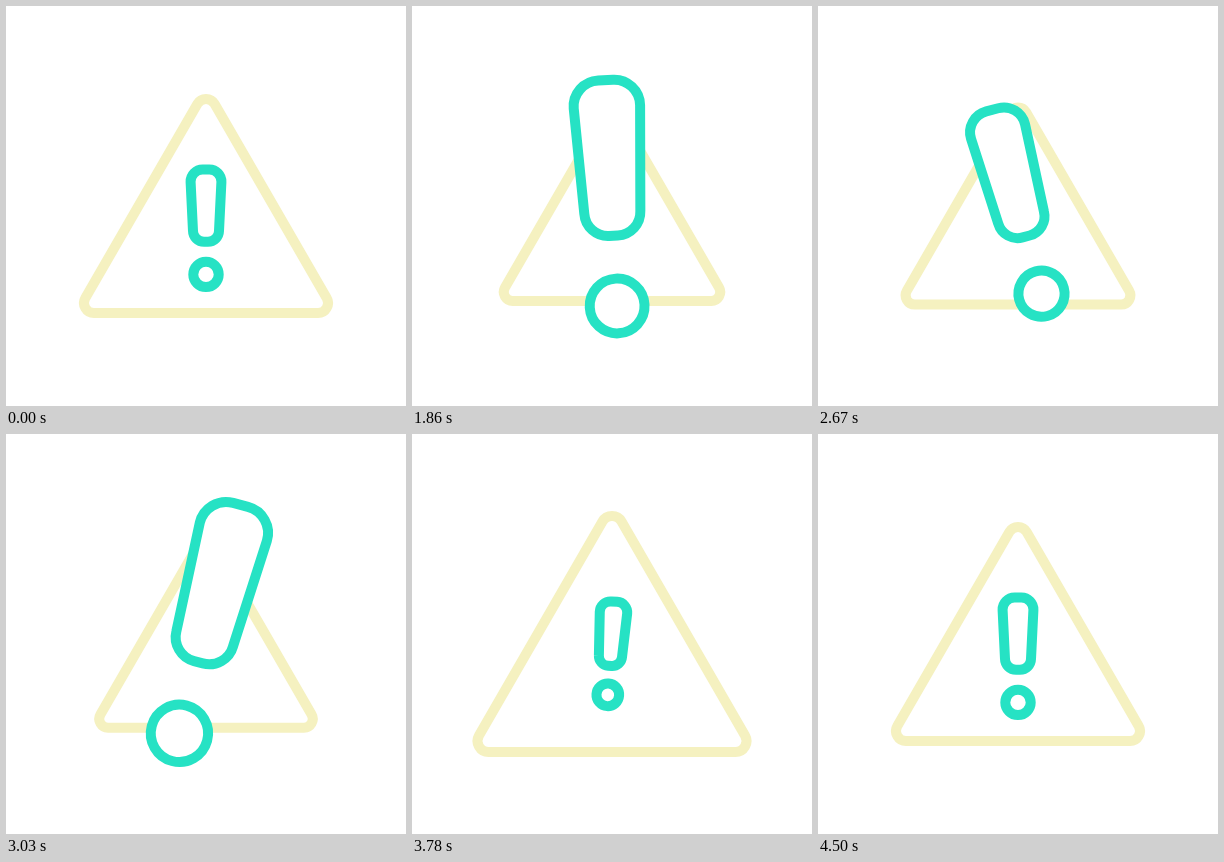
Animation of 400x400 px, one loop 4.56 s. Source, as an HTML page:

```html
<!DOCTYPE html>
<html lang="en">
<head>
<meta charset="utf-8">
<title>Warning sign</title>
<style>
  html, body { margin: 0; width: 100%; height: 100%; overflow: hidden; background: #fff; }
  svg { display: block; width: 100%; height: 100%; }
  path, circle { fill: #fff; stroke-width: 10; vector-effect: non-scaling-stroke; }
  #triangle { stroke: #f5f1c0; }
  #mark { stroke: #26e2c4; }
</style>
</head>
<body>
<svg viewBox="0 0 400 400">
  <path id="triangle"/>
  <g id="mark">
    <path d="M-15.4-24A12 12 0 0 1-3.4-36.4H3.4A12 12 0 0 1 15.4-24L13 25A11 11 0 0 1 2 35.8H-2A11 11 0 0 1-13 25Z"/>
    <circle cy="68.4" r="12.7"/>
  </g>
</svg>
<script>
const LOOP = 4560, STEP = 30, REST_STEPS = 50, LAST_STEP = 100;
const triangle = document.getElementById('triangle');
const mark = document.getElementById('mark');

// Rises smoothly from 0 to 1 between two steps.
function ease(step, from, to) {
  const part = Math.min(1, Math.max(0, (step - from) / (to - from)));
  return (1 - Math.cos(Math.PI * part)) / 2;
}

// Rises to 1 at the peak and falls back to 0.
const bump = (step, from, peak, to) => ease(step, from, peak) - ease(step, peak, to);

// Shrinks, relaxes for a moment, then springs back past its rest size.
function triangleScale(step) {
  const shrink = ease(step, 0, 15) - .53 * bump(step, 15, 32.5, 50);
  const spring = Math.cos(Math.PI * Math.max(0, step - 60) / 13.5) * (1 - ease(step, 73.5, LAST_STEP));
  return 1 - .125 * shrink * spring;
}

// Swells twice, drops below its rest size and recovers.
function markScale(step) {
  return 1 + 1.28 * ease(step, 0, 15) - .79 * bump(step, 15, 27, 54)
    - 1.39 * ease(step, 54, 74) + .11 * ease(step, 74, LAST_STEP);
}

// A steady swing that fades in and out.
function markAngle(step) {
  return 15 * bump(step, 0, 34, 34.001 + 0) * 0 +
    15 * (ease(step, 0, 34) - ease(step, 50, 90)) * Math.cos(Math.PI * (step - 27) / 12);
}

// Equilateral triangle with rounded corners, centred on the origin.
function roundedTriangle(bottom, height, radius) {
  const half = height / Math.sqrt(3), top = bottom - height;
  const cut = radius * Math.sqrt(3), dx = cut / 2, dy = cut * Math.sqrt(3) / 2;
  const arc = `A${radius} ${radius} 0 0 1 `;
  return `M${-dx} ${top + dy}${arc}${dx} ${top + dy}` +
    `L${half - dx} ${bottom - dy}${arc}${half - cut} ${bottom}` +
    `H${cut - half}${arc}${dx - half} ${bottom - dy}Z`;
}

function draw(time) {
  const step = Math.min(LAST_STEP, Math.max(0, Math.floor(time % LOOP / STEP) - REST_STEPS));
  const scale = markScale(step);
  const lift = -41 * Math.max(0, scale - 1);
  triangle.setAttribute('transform', `translate(200 200) scale(${triangleScale(step)})`);
  mark.setAttribute('transform',
    `translate(200 200) rotate(${markAngle(step)}) translate(0 ${lift}) scale(${scale})`);
}

triangle.setAttribute('d', roundedTriangle(107, 224, 10));
const start = performance.now();
function tick() {
  draw(performance.now() - start);
  requestAnimationFrame(tick);
}
tick();
</script>
</body>
</html>
```
